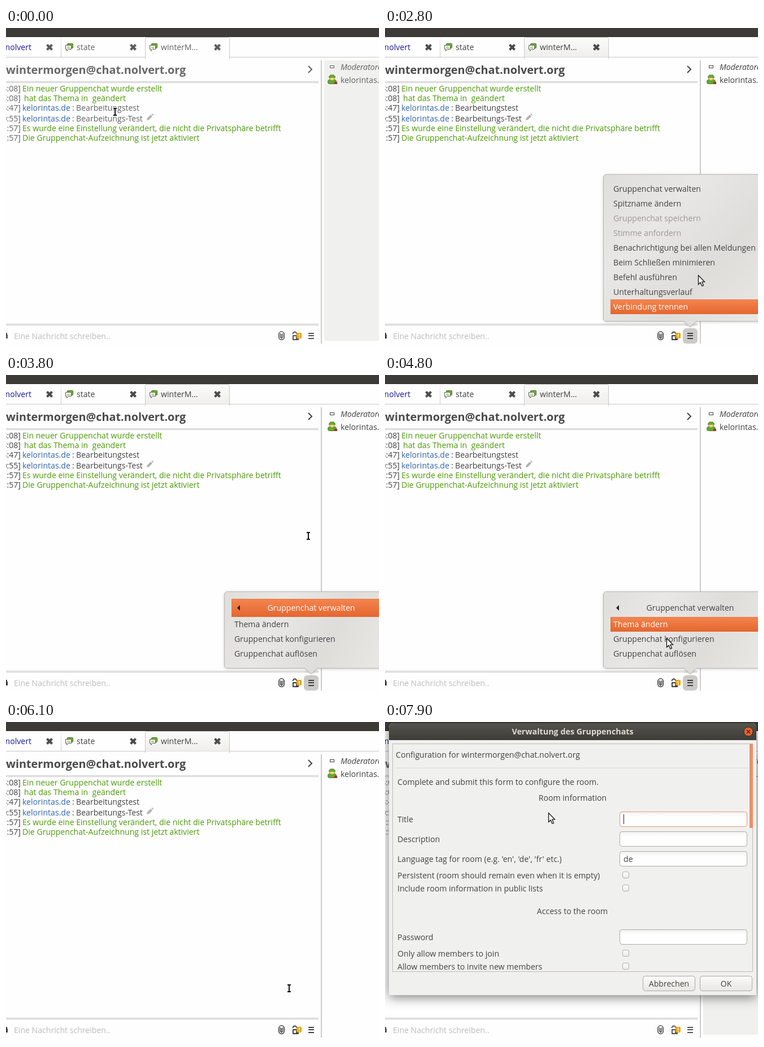
Animation of 660 by 563 pixels, one loop 8000 ms. Source, as an HTML page with a canvas:

```html
<!DOCTYPE html>
<html lang="de">
<head>
<meta charset="utf-8">
<title>Gruppenchat</title>
<style>
html, body { margin: 0; width: 100%; height: 100%; overflow: hidden; background: #fefefe; }
canvas { display: block; width: 660px; height: 563px; }
</style>
</head>
<body>
<canvas id="stage" width="660" height="563"></canvas>
<script>
const c = document.getElementById('stage').getContext('2d');
const LOOP = 8000;
const FONT = '"Open Sans", "Noto Sans", sans-serif';
const ROOM = 'wintermorgen@chat.nolvert.org';
const USER = 'kelorintas.de';

// pointer: time, x, y, kind (I = text beam, A = arrow)
const POINTER = [
  [0, 193, 148, 'I'], [100, 204, 158, 'I'], [700, 302, 224, 'I'], [1000, 428, 371, 'I'],
  [1200, 493, 470, 'I'], [1300, 530, 529, 'A'], [1500, 539, 545, 'A'], [1900, 540, 538, 'A'],
  [2000, 540, 528, 'A'], [2100, 540, 519, 'A'], [2300, 540, 530, 'A'], [2400, 541, 520, 'A'],
  [2500, 543, 507, 'A'], [2800, 554, 436, 'A'], [2900, 580, 350, 'A'], [3000, 600, 294, 'A'],
  [3200, 622, 386, 'A'], [3400, 646, 389, 'A'], [3600, 530, 281, 'A'], [3800, 535, 284, 'I'],
  [4400, 515, 357, 'I'], [4600, 510, 400, 'A'], [4700, 505, 434, 'A'], [4800, 498, 464, 'A'],
  [4900, 500, 488, 'A'], [5000, 503, 504, 'A'], [5400, 500, 486, 'A'], [5500, 496, 466, 'A'],
  [5700, 646, 505, 'A'], [5900, 498, 462, 'A'], [6100, 501, 470, 'I'], [7000, 470, 399, 'A'],
  [7200, 540, 357, 'A'], [7400, 420, 230, 'A'], [7500, 330, 180, 'A'], [7600, 263, 155, 'A'],
  [7800, 404, 158, 'A'], [7900, 289, 160, 'A']
];
// highlighted row in the open menu
const HIGHLIGHT = [
  [2300, 8], [2900, 6], [3000, 1], [3200, 4], [3400, 0],
  [3800, 0], [4700, 1], [4900, 2], [5000, 3], [5500, 2]
];
const MENU = ['Gruppenchat verwalten', 'Spitzname ändern', 'Gruppenchat speichern',
  'Stimme anfordern', 'Benachrichtigung bei allen Meldungen', 'Beim Schließen minimieren',
  'Befehl ausführen', 'Unterhaltungsverlauf', 'Verbindung trennen'];
const SUBMENU = ['Thema ändern', 'Gruppenchat konfigurieren', 'Gruppenchat auflösen'];

const at = (table, t) => table.filter(r => r[0] <= t).pop();

function text(s, x, mid, color, { size = 14.1, style = '', align = 'left' } = {}) {
  c.font = `${style} ${size}px ${FONT}`;
  c.textAlign = align;
  c.fillStyle = color;
  c.fillText(s, x, mid + size * 0.36);
}
function rect(x, y, w, h, color) {
  c.fillStyle = color;
  c.fillRect(x, y, w, h);
}
function poly(points, fill, stroke, width = 1, close = true) {
  c.beginPath();
  points.forEach(([x, y]) => c.lineTo(x, y));
  if (close) c.closePath();
  if (fill) { c.fillStyle = fill; c.fill(); }
  if (stroke) { c.strokeStyle = stroke; c.lineWidth = width; c.stroke(); }
}
function round(x, y, w, h, r, fill, stroke) {
  c.beginPath();
  c.roundRect(x, y, w, h, r);
  if (fill) { c.fillStyle = fill; c.fill(); }
  if (stroke) { c.strokeStyle = stroke; c.lineWidth = 1; c.stroke(); }
}
function disc(x, y, r, fill, stroke) {
  c.beginPath();
  c.arc(x, y, r, 0, 7);
  c.fillStyle = fill;
  c.fill();
  if (stroke) { c.strokeStyle = stroke; c.lineWidth = 1; c.stroke(); }
}
function grad(x0, y0, x1, y1, ...colors) {
  const g = c.createLinearGradient(x0, y0, x1, y1);
  colors.forEach((v, i) => g.addColorStop(i / (colors.length - 1), v));
  return g;
}
function shadow(color, blur, y = 0) {
  c.shadowColor = color;
  c.shadowBlur = blur;
  c.shadowOffsetY = y;
}
const noShadow = () => shadow('transparent', 0);
function doubleLine(y) {
  rect(0, y, 553, 1, '#c6c6c6');
  rect(0, y + 2, 553, 1, '#c6c6c6');
}

function cross(x, y, color) {
  poly([[x - 4.5, y - 4.5], [x + 4.5, y + 4.5]], null, color, 4, false);
  poly([[x + 4.5, y - 4.5], [x - 4.5, y + 4.5]], null, color, 4, false);
}
function bubbles(x, y) {
  round(x + 3.5, y + .5, 10, 8, 1, '#6fb52c', '#4d6340');
  poly([[x + .5, y + 3.5], [x + 10.5, y + 3.5], [x + 10.5, y + 10.5], [x + 5.5, y + 10.5],
    [x + 2.5, y + 13.5], [x + 2.5, y + 10.5], [x + .5, y + 10.5]], '#f4f8ee', '#55604e');
  rect(x + 3, y + 6, 5, 1, '#8db76a');
  rect(x + 3, y + 8, 5, 1, '#8db76a');
}
function tabs(focus, fg) {
  rect(0, 0, 660, 16, '#3c3b37');
  rect(0, 15, 660, 1, '#302f2c');
  rect(0, 51, 660, 1, '#c9c7c5');
  rect(97, 17, 1, 34, grad(0, 17, 0, 51, '#eee', '#c9c7c5'));
  round(246.5, 16.5, 149, 38, [3, 3, 0, 0],
    focus ? grad(0, 16, 0, 51, '#fcfcfb', '#efeeec') : '#fefefe', '#c9c7c5');
  rect(247, 52, 148, 4, '#fefefe');
  if (focus) rect(247, 51, 148, 1, '#dddbd8');
  text('nolvert', 45, 34, '#15159a', { align: 'right' });
  text('state', 125, 34, fg);
  text('winterM…', 274, 34, fg);
  [77, 225, 374].forEach(x => cross(x, 34, focus ? '#4b4b4b' : '#5d5d5d'));
  bubbles(105, 27);
  bubbles(254, 27);
}
function messages(fg) {
  const green = '#4b9a06', blue = '#2f64a8';
  const rows = [[107, '13:08'], [124, '13:08'], [141, '13:47'], [160, '10:55'], [177, '11:57'], [194, '11:57']];
  rows.forEach(([y, s]) => text(`[${s}]`, 26, y, fg, { align: 'right' }));
  text('Ein neuer Gruppenchat wurde erstellt', 29, 107, green);
  text('hat das Thema in  geändert', 32, 124, green);
  text('Es wurde eine Einstellung verändert, die nicht die Privatsphäre betrifft', 29, 177, green);
  text('Die Gruppenchat-Aufzeichnung ist jetzt aktiviert', 29, 194, green);
  [[141, 'Bearbeitungstest'], [160, 'Bearbeitungs-Test']].forEach(([y, s]) => {
    text(USER, 29, y, blue);
    text(': ', 117, y, fg);
    text(s, 124, y, fg);
  });
  poly([[249, 163], [250, 159], [256, 153], [259, 156], [253, 162]], '#b3b3b3');
  poly([[257, 152], [259, 151], [261, 153], [260, 155]], '#b3b3b3');
}
function inputBar(fg, open) {
  doubleLine(522);
  rect(0, 538, 2, 10, fg);
  rect(2, 541, 1, 7, fg);
  text('Eine Nachricht schreiben..', 14, 544, '#bcbcbc');
  if (open) round(527, 530, 26, 27, 6, '#cccac8');
  c.lineWidth = 1.6;
  c.strokeStyle = fg;
  c.beginPath();
  c.roundRect(482.8, 535.8, 9.5, 14.5, 4.8);
  c.moveTo(487.5, 547);
  c.lineTo(487.5, 540);
  c.stroke();
  poly([[489.8, 539], [489.8, 546], [487.5, 548], [485.4, 546], [485.4, 539]], null, fg, 1.2, false);
  c.beginPath();
  c.arc(511, 540, 3.4, Math.PI, 0);
  c.lineWidth = 2;
  c.strokeStyle = fg;
  c.stroke();
  round(507, 542, 11, 9, 1, fg);
  rect(509, 544, 4, 5, '#fefefe');
  round(514, 538, 9, 10, 2, '#e9a60c');
  rect(518, 540, 1.5, 4, '#fff');
  rect(518, 545, 1.5, 1.5, '#fff');
  [538, 542, 547].forEach(y => rect(535, y, 10, 2, fg));
}
function roster(focus, fg) {
  rect(557, 57, 2, 500, '#cbcbcb');
  if (!focus) rect(563, 57, 97, 495, '#f0f0ee');
  c.strokeStyle = fg;
  c.lineWidth = 1;
  c.strokeRect(573.5, 66.5, 7, 4);
  text('Moderatoren', 592, 69, fg, { style: 'italic' });
  text(USER, 592, 92, fg);
  round(569.5, 91.5, 15, 7, 3, '#62a831', '#447d20');
  disc(577, 88.5, 4.5, '#efd873', '#6b8d2c');
  poly([[571, 87], [574, 83], [580, 83], [583, 87]], '#72ae35', '#447d20');
  rect(581, 95, 5, 4, '#b52b2b');
}
function mainWindow(focus, open) {
  const fg = focus ? '#404040' : '#626262';
  rect(0, 0, 660, 563, '#fefefe');
  tabs(focus, fg);
  text(ROOM, 0, 74, focus ? '#4a4a4a' : '#686868', { size: 19.8, style: 'bold' });
  poly([[535, 67], [541, 73], [535, 79]], null, focus ? '#444' : '#606060', 2, false);
  doubleLine(94);
  messages(fg);
  roster(focus, fg);
  inputBar(focus ? '#404040' : '#555', open);
}

function popover(top) {
  const outline = [[386.5, top + 4], [390, top + .5], [670, top + .5], [670, 517.5],
    [551, 517.5], [540, 527.5], [529, 517.5], [390, 517.5], [386.5, 514]];
  shadow('rgba(0,0,0,.22)', 5, 1);
  poly(outline, '#e4e2df');
  noShadow();
  poly(outline, grad(386, top, 660, 518, '#e0dedb', '#e9e7e5', '#dfddda', '#e8e7e4'), '#bab6b1');
}
function row(y, h) {
  rect(399, y, 270, h, grad(0, y, 0, y + h, '#f4854f', '#e4662f'));
  c.strokeStyle = '#dc6a38';
  c.lineWidth = 1;
  c.setLineDash([1, 1]);
  c.strokeRect(399.5, y + .5, 270, h - 1);
  c.setLineDash([]);
}
function mainMenu(hot) {
  popover(258);
  row(271 + 26 * hot, 26);
  MENU.forEach((s, i) => {
    const color = i === hot ? '#fff' : i === 2 || i === 3 ? '#9b9895' : '#424242';
    text(s, 404, 284 + 26 * i, color);
  });
}
function subMenu(hot) {
  popover(382);
  if (hot) row(401 + 26 * hot, 26); else row(395, 32);
  poly([[409, 411], [414, 406], [414, 416]], '#222');
  text('Gruppenchat verwalten', 540, 411, hot ? '#424242' : '#fff', { align: 'center' });
  SUBMENU.forEach((s, i) => text(s, 404, 440 + 26 * i, hot === i + 1 ? '#fff' : '#424242'));
}

function entry(y, active) {
  round(415.5, y + .5, 225, 26, 4, grad(0, y, 0, y + 9, '#f1f0ef', '#fefefe'), active ? '#e39b78' : '#aeaaa6');
}
function button(x, label) {
  round(x + .5, 448.5, 92, 26, 4, grad(0, 448, 0, 475, '#fbfbfa', '#e8e6e4'), '#aba7a2');
  text(label, x + 46.5, 462, '#424242', { align: 'center' });
}
function dialog(t) {
  const fg = '#424242';
  const center = { align: 'center' };
  shadow('rgba(0,0,0,.5)', 20, 4);
  round(7, 2, 650, 480, [7, 7, 0, 0], '#f0f0ee');
  noShadow();
  round(7, 2, 650, 30, [7, 7, 0, 0], grad(0, 2, 0, 32, '#55534d', '#3d3c38'));
  text('Verwaltung des Gruppenchats', 332, 17, '#dfdbd2', { size: 14.3, style: 'bold', align: 'center' });
  disc(643, 17, 8, '#e6622f', '#2f2d29');
  poly([[640, 14], [646, 20]], null, '#4c2416', 1.5, false);
  poly([[646, 14], [640, 20]], null, '#4c2416', 1.5, false);
  c.strokeStyle = '#bfbbb7';
  c.lineWidth = 1;
  c.strokeRect(13.5, 38.5, 637, 402);
  text('Configuration for ' + ROOM, 19, 58, fg);
  rect(19, 81, 626, 1, '#d3d1ce');
  rect(19, 82, 626, 1, '#fafafa');

  c.save();
  c.beginPath();
  c.rect(14, 39, 636, 401);
  c.clip();
  text('Complete and submit this form to configure the room.', 22, 106, fg);
  text('Room information', 332, 134, fg, center);
  text('Access to the room', 331.5, 334, fg, center);
  [['Title', 172], ['Description', 207], ["Language tag for room (e.g. 'en', 'de', 'fr' etc.)", 242], ['Password', 380]]
    .forEach(([s, y], i) => {
      text(s, 22, y, fg);
      entry(y - 14, i === 0);
    });
  text('de', 422, 242, fg);
  [['Persistent (room should remain even when it is empty)', 270], ['Include room information in public lists', 293],
    ['Only allow members to join', 408], ['Allow members to invite new members', 431]]
    .forEach(([s, y]) => {
      text(s, 22, y + 1, fg);
      round(420.5, y - 5.5, 11, 11, 2.5, grad(0, y - 6, 0, y + 6, '#fdfdfd', '#ecebe9'), '#b3afab');
    });
  c.restore();

  if (t < 7200 || t >= 7600) rect(422, 163, 1, 17, '#222');
  rect(645, 39, 6, 148, t < 7000 ? '#c5c1bc' : '#eb9069');
  button(456, 'Abbrechen');
  button(557, 'OK');
}

function pointer(x, y, kind) {
  c.save();
  c.translate(x, y);
  if (kind === 'A') {
    poly([[.5, .5], [.5, 16.5], [4, 13.2], [7, 19.5], [9.5, 18.3], [6.8, 12.2], [11.5, 12]], '#fff', '#111', 1.3);
  } else {
    [['#fff', 4], ['#111', 2]].forEach(([color, w]) => {
      const e = w / 2 - 1;
      rect(-w / 2, -6, w, 13, color);
      rect(-3 - e, -7 - e, 6 + 2 * e, 2 + 2 * e, color);
      rect(-3 - e, 5 - e, 6 + 2 * e, 2 + 2 * e, color);
    });
  }
  c.restore();
}

function draw(t) {
  const open = t >= 2300 && t < 6100;
  mainWindow(t >= 2300 && t < 6800, open);
  if (open) {
    const hot = at(HIGHLIGHT, t)[1];
    c.globalAlpha = t < 2400 ? .35 : t < 2500 ? .75 : 1;
    (t < 3800 ? mainMenu : subMenu)(hot);
  }
  if (t >= 6500) {
    c.globalAlpha = t < 6600 ? .6 : 1;
    dialog(t);
  }
  c.globalAlpha = 1;
  pointer(...at(POINTER, t).slice(1));
}

const start = performance.now();
function tick() {
  draw((performance.now() - start) % LOOP);
  requestAnimationFrame(tick);
}
tick();
</script>
</body>
</html>
```
